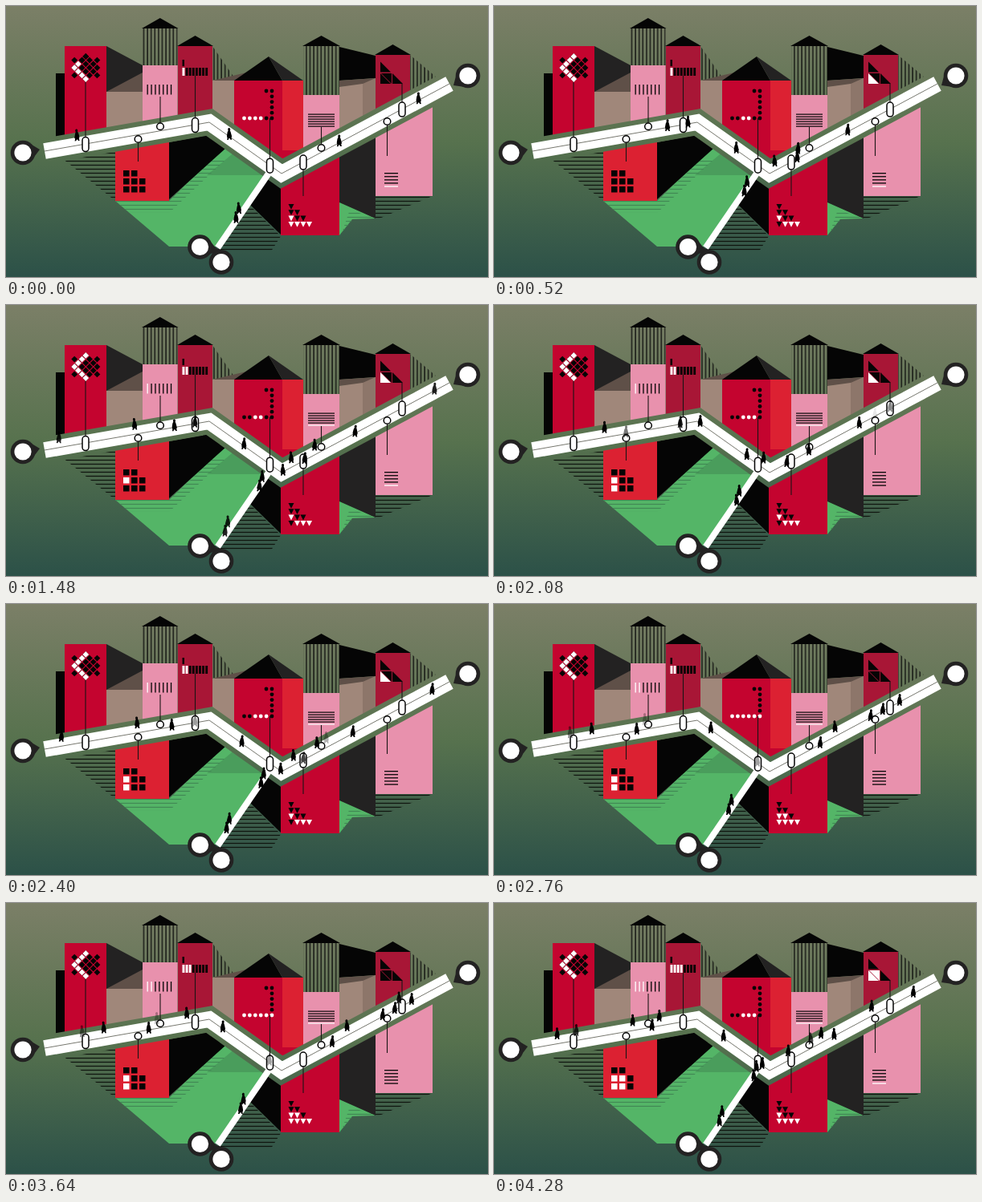
Write an HTML page that moves like this. It is 600 by 338 pixels and loops after 4.32 s.

```html
<!DOCTYPE html>
<html lang="en">
<head>
<meta charset="utf-8">
<title>Paths through the city</title>
<style>
  html, body { margin: 0; width: 100%; height: 100%; overflow: hidden; background: #56704f; }
  svg { display: block; width: 100vw; height: 100vh; }
</style>
</head>
<body>
<svg viewBox="0 0 600 338" preserveAspectRatio="none">
  <defs>
    <linearGradient id="sky" gradientUnits="userSpaceOnUse" x1="0" y1="0" x2="0" y2="338">
      <stop offset="0" stop-color="#7b7f67"/>
      <stop offset=".5" stop-color="#57724e"/>
      <stop offset="1" stop-color="#2c5148"/>
    </linearGradient>
    <pattern id="bars" width="4.6" height="8" patternUnits="userSpaceOnUse" patternTransform="translate(170.5)"><path d="M1 0V8" stroke="#0b0b0b" stroke-width="1.3"/></pattern>
    <pattern id="rows" width="8" height="5" patternUnits="userSpaceOnUse"><path d="M0 3.5H8" stroke="#10150f" stroke-width="1.3"/></pattern>
    <pattern id="grass" width="8" height="5" patternUnits="userSpaceOnUse"><path d="M0 3.5H8" stroke="#418754" stroke-width="1.2"/></pattern>
    <path id="walker" d="M-.6-7.4C1-8 2-6.200 1.200-4.500L2.300-2.200 3.200 2.200 2.700 5.200 3.200 7.200H1.600L.9 5.400-.4 5.600-1.100 7.200H-2.800L-2.200 4.600-3 3.200-1.800-2.200-1.100-4.200C-1.900-5.400-1.600-6.900-.6-7.400Z"/>
  </defs>
  <g id="city"></g>
  <g id="icons"></g>
  <g id="stops"></g>
  <g id="crowd"></g>
</svg>
<script>
const LOOP = 4320, CYCLE = 880, STEP = 40;
const RED = '#c4042f', BRIGHT = '#dc2132', WINE = '#a81636', PINK = '#e891ad';
const BLACK = '#050505', COAL = '#232222', TAN = '#a0877a', UMBER = '#5f5048';
const GREEN = '#54b567', MOSS = '#4a9d5c', WHITE = '#fff';
const BARS = 'url(#bars)', ROWS = 'url(#rows)', GRASS = 'url(#grass)', SKY = 'url(#sky)';
const [city, icons, stopLayer, crowd] = ['city', 'icons', 'stops', 'crowd'].map(id => document.getElementById(id));

function add(parent, tag, attrs) {
  const el = document.createElementNS('http://www.w3.org/2000/svg', tag);
  for (const key in attrs) el.setAttribute(key, attrs[key]);
  parent.append(el);
  return el;
}
const poly = (fill, points, parent = city) => add(parent, 'polygon', { points, fill });
const box = (fill, x, y, width, height, parent = city) => add(parent, 'rect', { x, y, width, height, fill });
const line = (points, stroke, width, parent = city) =>
  add(parent, 'polyline', { points, fill: 'none', stroke, 'stroke-width': width, 'stroke-miterlimit': 8 });
const range = (n, make) => Array.from({ length: n }, (_, i) => make(i));

// A wall with an optional hatched storey and a pointed roof
function tower(fill, x, y, w, base, hatch = 0) {
  const top = y - hatch;
  box(BARS, x, top, w, hatch);
  box(fill, x, y, w, base - y);
  poly(BLACK, `${x - 1},${top} ${x + w / 2},${top - 13} ${x + w + 1},${top}`);
}

// Upper skyline
box(SKY, 0, 0, 600, 338);
box(BLACK, 62, 84, 12, 82);
box(RED, 73, 50, 52, 120);
poly(COAL, '125,50 170,74 170,107 125,107');
poly(UMBER, '125,107 170,83 170,107');
box(TAN, 125, 107, 45, 50);
tower(PINK, 170, 74, 43.500, 154, 46);
poly(BARS, '257,50 286,92 257,92');
poly(UMBER, '257,93 299,83 285,93');
box(TAN, 257, 93, 28, 70);
tower(WINE, 214, 50, 43, 145);
box(RED, 284, 93, 60, 110);
box(BRIGHT, 344, 93, 26, 105);
poly(BLACK, '284,93 327,63 344,93');
poly(COAL, '327,63 370,93 344,93');
tower(PINK, 370, 111, 45, 191, 61);
poly(BLACK, '415,51 460,62 460,90 415,93');
poly(UMBER, '415,93 460,90 444,98 415,101');
poly(TAN, '415,101 444,97 444,150 415,165');
poly('#8d766a', '444,97 460,90 460,145 444,150');
poly(BARS, '503,61 537,90 503,110');
tower(WINE, 460, 61, 43, 136);

// Lower blocks and shadows
poly(ROWS, '70,190 136,178 136,243');
poly(GREEN, '203,243 272,176 330,211 262,300 203,300 136,243');
poly(MOSS, '250,211 286,181 330,211');
poly(GRASS, '136,243 203,243 256,193 272,193 203,258 153,258');
poly(BLACK, '203,170 251,161 274,177 203,241');
box(BRIGHT, 136, 168, 67, 75);
poly(ROWS, '303,248 342,287 330,306 262,306');
poly(BLACK, '328,208 343,220 343,286 304,248');
poly(GREEN, '415,243 460,265 431,266 415,286');
poly(GRASS, '428,254 460,265 431,267 418,283');
poly(COAL, '415,172 460,148 460,265 415,245');
box(RED, 342, 180, 73, 106);
poly(ROWS, '460,237 531,237 460,267');
poly(PINK, '460,158 531,121 531,237 460,237');

// Walkway: the gap beside it shows the sky
const knots = [[48, 181], [253, 145], [343, 209], [552, 97]];
const route = knots.join(' ');
line(route, SKY, 32);
line('327.5,208 263.5,301.5', WHITE, 7.800);
line(route, WHITE, 20);
line(route, '#77786f', 1);

function pin(x, y, tipX, tipY) {
  const dx = tipX - x, dy = tipY - y, d = Math.hypot(dx, dy);
  const nx = -dy / d * 13, ny = dx / d * 13, bx = x + dx / d * 7, by = y + dy / d * 7;
  poly(COAL, `${bx + nx},${by + ny} ${tipX},${tipY} ${bx - nx},${by - ny}`);
  add(city, 'circle', { cx: x, cy: y, r: 15.300, fill: COAL });
  add(city, 'circle', { cx: x, cy: y, r: 10.600, fill: WHITE });
}
pin(21, 183, 42, 179);
pin(575, 87, 557, 99);
pin(241.500, 300.500, 263, 304);
pin(268, 319.500, 259, 301);

// Route helpers: x to distance, distance to point
const spans = knots.slice(1).map(([bx, by], i) => {
  const [x, y] = knots[i], dx = bx - x, dy = by - y;
  return { x, y, dx, dy, len: Math.hypot(dx, dy) };
});
function along(s) {
  const last = spans.length - 1;
  let i = 0;
  while (i < last && s > spans[i].len) s -= spans[i++].len;
  const { x, y, dx, dy, len } = spans[i];
  return [x + dx * s / len, y + dy * s / len];
}
const distance = x => spans.reduce((sum, p) => sum + p.len * Math.max(0, (Math.min(x, p.x + p.dx) - p.x) / p.dx), 0);

// Pills sit on the route, rings a little to the side of their stem
function stop(x, end, pill) {
  const side = Math.sign(end - along(distance(x))[1]);
  const y = along(distance(x))[1] + (pill ? 0.500 : side * 5.500);
  const w = pill ? 4 : 4.300, h = pill ? 9 : w;
  line(`${x},${y + side * h} ${x},${end}`, '#1a1515', 1.100, stopLayer);
  add(stopLayer, 'rect', { x: x - w, y: y - h, width: 2 * w, height: 2 * h, rx: w, fill: WHITE, stroke: BLACK, 'stroke-width': 1.500 });
}
stop(99, 95, true);
stop(164.500, 194);
stop(192, 113);
stop(235.500, 87, true);
stop(328.500, 140, true);
stop(370, 237, true);
stop(392.500, 151);
stop(474.500, 187);
stop(493, 97, true);

// Wall signs
const cell = (x, y, w, h = w) => box(BLACK, x, y, w, h, icons);
const dot = (cx, cy) => add(icons, 'circle', { cx, cy, r: 2.400, fill: BLACK });
const diamond = (i, j) => {
  const x = 99.300 + i * 4.700, y = 77 + j * 4.700, r = 3.900;
  return poly(BLACK, `${x},${y - r} ${x + r},${y} ${x},${y + r} ${x - r},${y}`, icons);
};
const corner = (x, y) => poly(BLACK, `${x},${y} ${x},${y + 13} ${x + 13},${y + 13}`, icons);
const wedge = (col, row) => {
  const x = 351.500 + col * 7.500, y = 247 + row * 7.300;
  return poly(BLACK, `${x},${y} ${x + 7},${y} ${x + 3.500},${y + 6.800}`, icons);
};
const block = (col, row) => cell(146 + col * 10, 205 + row * 10, 7.500);

range(49, n => {
  const i = n % 7 - 3, j = Math.floor(n / 7) - 3, reach = Math.abs(i) + Math.abs(j);
  if ((i + j) % 2 && (reach <= 3 || Math.abs(i) === 3)) diamond(i, j);
});
cell(219.500, 67, 2.500, 8);
range(5, i => dot(331, 106 + i * 6.800));
dot(324, 106);
corner(466, 69.500);
corner(481, 84);
range(3, i => wedge(i && i - 1, i && 1));
range(2, i => block(i, 0));

// Each counter: its cells, and the rule that turns cell i white at time t
const between = (t, a, b) => t >= a && t < b;
const resting = t => between(t, 2480, 3880);
const dipped = t => between(t, 280, 2440);
const counters = [
  [range(7, i => diamond(Math.abs(i - 3) - 3, i - 3)), (i, t) => i > 1 || t > 160],
  [range(7, i => cell(175.500 + i * 4.900, 98, 1.300, 12.500)), (i, t) => i < Math.floor(t / 1380)],
  [range(8, i => cell(219.500 + i * 4.100, 77, 2.900, 10)), (i, t) => i <= Math.floor(t / 1400)],
  [range(6, i => dot(296.500 + i * 6.900, 140)), (i, t) => resting(t) || (t < 280 ? i < 4 : i > 1 && i < (t < 1800 ? 4 : 5))],
  [range(6, i => cell(376, 134.500 + i * 3, 33, 1.200)), (i, t) => i === 5 && t > 1000],
  [[corner(466, 84), poly(BLACK, '467,84 480,84 480,97', icons)], (i, t) => t > 3900 || (i === 0 && dipped(t))],
  [[[0, 1], [0, 2], [1, 2], [1, 1]].map(c => block(...c)), (i, t) => i < (t > 3880 ? 4 : Math.min(2, Math.floor(t / 1000)))],
  [range(7, i => i < 3 ? wedge(i, 2) : wedge(i - 3, 3)), (i, t) => i === 0 || i > 3 || (i === 3 && !dipped(t)) || (i === 1 && resting(t))],
  [range(5, i => cell(471, 208 + i * 4.100, 17, 1.300)), (i, t) => i === 4 && !between(t, 1880, 3880)]
];
range(2, i => block(2, i + 1));

function setCounters(t) {
  for (const [cells, isWhite] of counters)
    cells.forEach((el, i) => el.setAttribute('fill', isWhite(i, t) ? WHITE : BLACK));
}

// Walkers hop from stop to stop; each leg departs once per cycle at its own phase
const SPEED = 0.081, CLIMB = 0.064, FADE = 70;
const legs = [];
function line_of(xs, phases, debut) {
  phases.forEach((phase, i) => legs.push({ from: distance(xs[i]), to: distance(xs[i + 1]), phase, first: debut(i) }));
}
const leftDebut = i => i % 2 ? 250 : -LOOP;
const rightDebut = i => i > 1 ? 900 * i + 600 : i ? 0 : -CYCLE;
line_of([536, 493, 474, 370, 328, 235, 164], [560, 870, 45, 240, 115, 277], leftDebut);
line_of([62, 99, 192, 235], [560, 725, 595], rightDebut);
line_of([328, 370, 398, 474, 493], [215, 410, 640, 790], rightDebut);

const pool = range(32, () => add(crowd, 'use', { href: '#walker' }));
let used = 0;
function place(x, y, flip, opacity, age) {
  const el = pool[used++];
  el.setAttribute('transform', `translate(${x} ${y}) rotate(${3 * Math.sin(age / 70)}) scale(${flip} 1)`);
  el.setAttribute('opacity', opacity);
}

function launches(t, phase, span, first, show) {
  for (let at = phase - 3 * CYCLE; at <= t; at += CYCLE) {
    const age = t - at;
    if (at < first || age > span + FADE) continue;
    show(Math.min(age, span), Math.min(1, 0.300 + age / FADE, 1 - (age - span) / FADE));
  }
}

function setCrowd(t) {
  used = 0;
  for (const { from, to, phase, first } of legs) {
    const dir = Math.sign(to - from), short = dir > 0 ? 5 : 0;
    launches(t, phase, (Math.abs(to - from) - short) / SPEED, first, (age, opacity) => {
      const [x, y] = along(from + dir * SPEED * age);
      place(x + 0.500, y - (dir > 0 ? 13 : 2.800), dir, opacity, age);
    });
  }
  launches(t, 560, 72 / CLIMB, -LOOP, (age, opacity) => {
    const y = 278 - CLIMB * age, x = 325.500 - (y - 208) * 0.760;
    place(x + 1.700, y - 5.500, 1, opacity, age);
    place(x - 1.700, y + 6, 1, opacity, age + 90);
  });
  pool.forEach((el, i) => el.setAttribute('visibility', i < used ? 'visible' : 'hidden'));
}

const begin = performance.now();
function tick() {
  const t = Math.floor((performance.now() - begin) % LOOP / STEP) * STEP;
  setCounters(t);
  setCrowd(t);
  requestAnimationFrame(tick);
}
tick();
</script>
</body>
</html>
```
